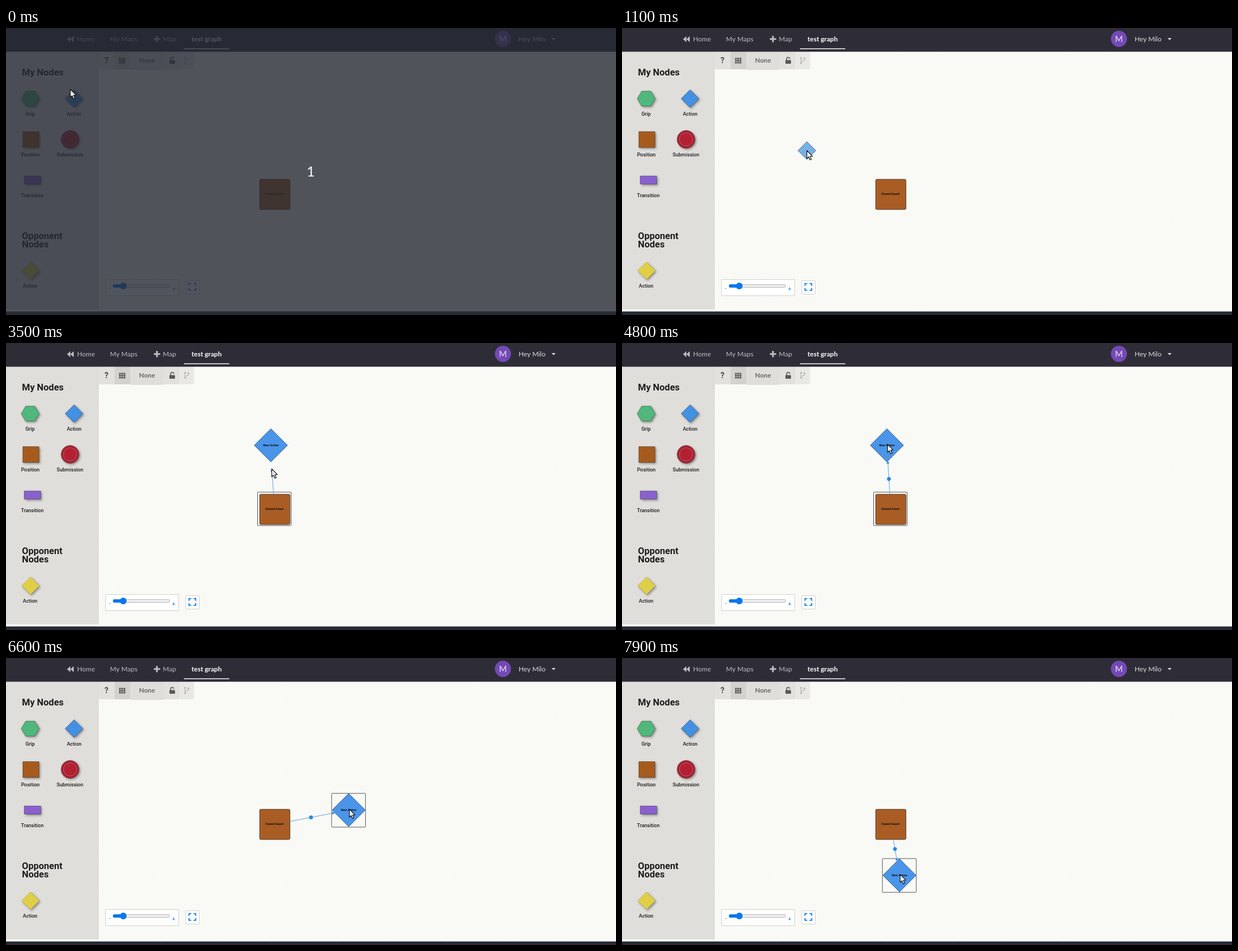
These frames come from a looping animation (1090x514 px, 8000 ms). An HTML page with a canvas:

```html
<!DOCTYPE html>
<html lang="en">
<head>
<meta charset="utf-8">
<title>Graph editor</title>
<style>
  html, body { margin: 0; width: 100%; height: 100%; overflow: hidden; background: #f9f9f5; }
  canvas { display: block; width: 1090px; height: 514px; }
</style>
</head>
<body>
<canvas id="stage" width="1090" height="514"></canvas>
<script>
const W = 1090, H = 514, LOOP = 8000, STEP = 100;
const ctx = document.getElementById('stage').getContext('2d');
const LATO = 'Lato, sans-serif', ROBOTO = 'Roboto, sans-serif';
const BLUE = '#2489e6', ACTION_BLUE = '#4490e2';

const LIFT = 400, DROP = 2200, PICK = 3100, RELEASE = 4300, LINK = 4500, GRAB = 4900;
const guard = { x: 480.3, y: 298, half: 27 };
const ACTION_R = 29.7;

// Pointer moves: each starts where the last one ended; "via" bends the path.
const moves = [
  { from: 100, to: 1600, end: [476, 194], via: [160, 275] },
  { from: 1700, to: 2000, end: [476, 184] },
  { from: 2100, to: 2300, end: [512, 254], via: [470, 177] },
  { from: 2400, to: 2900, end: [480, 300], via: [542, 268] },
  { from: 3000, to: 3800, end: [472.5, 191] },
  { from: 4400, to: 4800, end: [474.5, 181.5] }
];

// The action node is swung around the guard through these points: [time, x, y].
const swing = [
  [4900, 473.3, 183.2], [5300, 499, 173], [5900, 567.8, 204.8],
  [6700, 614, 283], [7200, 576.8, 342.8], [7900, 495.8, 389.2]
];

const mix = (a, b, u) => a + (b - a) * u;
const clamp = u => Math.max(0, Math.min(1, u));
const smooth = u => u * u * (3 - 2 * u);

function pointerAt(t) {
  if (t >= GRAB) {
    const p = actionAt(t);
    return { x: p.x + 1.2, y: p.y - 1.6 };
  }
  let at = [115, 110];
  for (const m of moves) {
    if (t < m.from) break;
    const u = smooth(clamp((t - m.from) / (m.to - m.from)));
    const bend = m.via || at.map((v, i) => mix(v, m.end[i], .5));
    at = at.map((v, i) => mix(mix(v, bend[i], u), mix(bend[i], m.end[i], u), u));
  }
  return { x: at[0], y: at[1] };
}

// Cubic through the swing points, with slopes taken from their neighbours.
function actionAt(t) {
  const last = swing.length - 1;
  t = Math.max(swing[0][0], Math.min(swing[last][0], t));
  const i = Math.max(0, swing.findIndex(k => k[0] >= t) - 1);
  const a = swing[i], b = swing[i + 1], span = b[0] - a[0], u = (t - a[0]) / span;
  const slope = (n, c) => {
    const p = swing[Math.max(0, n - 1)], q = swing[Math.min(last, n + 1)];
    return (q[c] - p[c]) / (q[0] - p[0]);
  };
  const at = c => mix(a[c], b[c], smooth(u))
    + span * u * (1 - u) * ((1 - u) * slope(i, c) - u * slope(i + 1, c));
  return { x: at(1), y: at(2) };
}

function paint(fill, stroke) {
  if (fill) { ctx.fillStyle = fill; ctx.fill(); }
  if (stroke) {
    ctx.shadowColor = 'transparent';
    ctx.strokeStyle = stroke;
    ctx.stroke();
  }
}

function rect(x, y, w, h, fill, stroke, r = 0) {
  ctx.beginPath();
  ctx.roundRect(x, y, w, h, r);
  paint(fill, stroke);
}

function disc(x, y, r, fill, stroke) {
  ctx.beginPath();
  ctx.arc(x, y, r, 0, Math.PI * 2);
  paint(fill, stroke);
}

function poly(points, fill, stroke) {
  ctx.beginPath();
  points.forEach(([x, y]) => ctx.lineTo(x, y));
  ctx.closePath();
  paint(fill, stroke);
}

function line(points, color, width) {
  ctx.lineWidth = width;
  ctx.beginPath();
  points.forEach(([x, y]) => ctx.lineTo(x, y));
  paint(null, color);
  ctx.lineWidth = 1;
}

function text(s, x, y, font, color, align = 'left') {
  ctx.font = font;
  ctx.fillStyle = color;
  ctx.textAlign = align;
  ctx.fillText(s, x, y);
}

const diamond = (x, y, r, fill, stroke) =>
  poly([[x, y - r], [x + r, y], [x, y + r], [x - r, y]], fill, stroke);

function shaded(draw) {
  ctx.save();
  ctx.shadowColor = 'rgba(0,0,0,.4)';
  ctx.shadowBlur = 4;
  ctx.shadowOffsetX = ctx.shadowOffsetY = 2;
  ctx.lineWidth = .6;
  draw();
  ctx.restore();
}

function header() {
  const pale = '#bdbcc1', light = '#dededf', base = 23.8;
  const link = (s, x) => text(s, x, base, '12px ' + LATO, pale);
  rect(0, 0, W, 42.5, '#2e2d37');
  for (const x of [109, 115]) poly([[x, 20], [x + 6, 14.8], [x + 6, 25.2]], pale);
  link('Home', 127);
  link('My Maps', 185.8);
  rect(264, 18.3, 11.5, 3, pale, null, .8);
  rect(268.2, 14, 3, 11.5, pale, null, .8);
  link('Map', 280.3);
  text('test graph', 358.5, base, 'bold 12px ' + LATO, '#fff', 'center');
  rect(318, 36.5, 81, 1.6, '#f4f4f5');
  disc(888, 19.5, 14.4, '#7449b6');
  text('M', 888, 25, '15px ' + LATO, '#eee8f6', 'center');
  text('Hey Milo', 916, base, '12px ' + LATO, light);
  poly([[975, 18], [982, 18], [978.5, 21.8]], light);
}

function sidebar() {
  const ink = '#1d1d1d', edge = 'rgba(40,40,40,.75)';
  const title = (s, y) => text(s, 28.5, y, 'bold 16.5px ' + ROBOTO, ink);
  const item = (s, x, y, shape) => {
    shaded(shape);
    text(s, x, y, '500 9px ' + ROBOTO, ink, 'center');
  };
  rect(0, 42, 166, 462, '#dfdedb');
  title('My Nodes', 85);
  title('Opponent', 378);
  title('Nodes', 393);
  const hexagon = Array.from({ length: 6 }, (_, i) => {
    const a = i * Math.PI / 3;
    return [43.3 + 16.2 * Math.cos(a), 126.5 + 15.5 * Math.sin(a)];
  });
  item('Grip', 43, 157, () => poly(hexagon, '#50b87c', edge));
  item('Action', 121.7, 157, () => diamond(121.7, 126.5, 16, ACTION_BLUE, edge));
  item('Position', 43.5, 230, () => rect(30, 185.5, 29, 28.5, '#a65b1d', edge));
  item('Submission', 114.3, 230, () => {
    disc(114.5, 199.5, 16, '#b42032', '#4a2428');
    disc(114.5, 199.5, 13, null, '#55282c');
    disc(114.5, 199.5, 12, null, '#c9898f');
  });
  item('Transition', 47, 302.8, () => rect(32.5, 265, 29.5, 14.5, '#8a60d0', edge));
  item('Action', 43, 465.2, () => diamond(43.8, 434.8, 15.8, '#e0cf46', 'rgba(120,110,40,.5)'));
}

function toolbar() {
  const ink = '#595959', faint = '#b9b8b6';
  rect(166, 42, 170, 32, '#e9e8e5', null, [0, 0, 4, 4]);
  rect(166, 42, 144, 32, '#e2e1de', null, [0, 0, 3, 3]);
  rect(194, 42, 28, 32, '#d3d2cf');
  rect(222, 42, 60, 33, '#dfdedb', null, [0, 0, 3, 3]);
  text('?', 179.5, 63, 'bold 14px ' + ROBOTO, '#4a4a4a', 'center');
  for (let i = 0; i < 9; i++) rect(202 + i % 3 * 4, 53.5 + (i / 3 | 0) * 3.6, 3.3, 2.8, ink);
  text('None', 252, 62, 'bold 11.7px ' + LATO, '#666', 'center');
  rect(292, 57.5, 10, 6.5, ink, null, 1);
  ctx.lineWidth = 1.6;
  ctx.beginPath();
  ctx.moveTo(294.2, 58);
  ctx.arc(296.9, 55.2, 2.7, Math.PI, 0);
  paint(null, ink);
  line([[320, 54], [320, 62]], faint, 1.3);
  line([[326, 55], [326, 57.5], [320, 60]], faint, 1.3);
  for (const [x, y] of [[320, 53.5], [320, 62.5], [326, 54.5]]) disc(x, y, 1.8, faint);
}

function zoomPanel() {
  const border = '#d0d0cd', fill = '#0b76ee';
  rect(178, 450.5, 130.5, 29, '#fff', border);
  text('-', 185.5, 470, '11px ' + ROBOTO, BLUE, 'center');
  text('+', 299.5, 471, '11px ' + ROBOTO, BLUE, 'center');
  rect(191.5, 459.5, 101, 5, '#efefef', '#b4b4b4', 2.5);
  rect(191, 459, 18, 6, fill, null, 3);
  disc(209.5, 462, 6, fill);
  rect(321, 452.5, 24.5, 24, '#fff', border, 1);
  for (const sx of [-1, 1]) for (const sy of [-1, 1]) {
    const x = 333 + sx * 6, y = 463.8 + sy * 6;
    line([[x - sx * 4, y], [x, y], [x, y - sy * 4]], BLUE, 2);
  }
}

function board() {
  rect(0, 42, W, 466, '#fcfcfa');
  rect(166, 42, W - 166, 462, '#f9f9f5');
  for (let y = 49; y < 504; y += 15)
    for (let x = 172; x < W; x += 15) rect(x, y, 1, 1, '#e7e7e3');
  rect(0, 507, W, 1, '#a9b4b8');
}

function nodeLabel(s, x, y) {
  text(s, x, y + 1.8, 'bold 5.4px ' + ROBOTO, '#111', 'center');
}

function guardNode(selected) {
  const { x, y, half } = guard;
  if (selected) rect(x - 30.8, y - 31, 60, 60, '#f7f7f5', '#555', 1);
  rect(x - half, y - half, half * 2, half * 2, '#a95d24', '#4f3726', 2);
  nodeLabel('Closed Guard', x - .7, y - .6);
}

function actionNode({ x, y }, selected) {
  if (selected) rect(x - 30.5, y - 30, 60.5, 60.5, null, '#555', 1);
  ctx.lineWidth = .8;
  diamond(x, y, ACTION_R, '#4a95e9', '#2c4766');
  ctx.lineWidth = 1;
  nodeLabel('New Action', x, y + .3);
}

// Arrow from the guard's border to p, stopping short by "inset" in diamond distance.
function edge(p, inset, dot) {
  const dx = p.x - guard.x, dy = p.y - guard.y;
  const reach = Math.max(Math.abs(dx), Math.abs(dy));
  if (reach <= guard.half) return;
  const along = s => [guard.x + dx * s, guard.y + dy * s];
  const head = 4.8 / Math.hypot(dx, dy);
  const start = guard.half / reach, end = 1 - inset / (Math.abs(dx) + Math.abs(dy));
  line([along(start), along(end)], '#5aa5e8', 1);
  if (dot) disc(...along((start + end - head) / 2), 3.4, BLUE);
  ctx.save();
  ctx.translate(...along(end));
  ctx.rotate(Math.atan2(dy, dx));
  poly([[0, 0], [-4.8, -2.6], [-4.8, 2.6]], BLUE);
  ctx.restore();
}

function pointer(p) {
  ctx.save();
  ctx.translate(p.x, p.y);
  ctx.lineJoin = 'round';
  ctx.lineWidth = 1.2;
  poly([[0, 0], [0, 14.2], [3.2, 11.3], [5.5, 16.8], [8, 15.7], [5.7, 10.4], [10, 10.2]], '#fff', '#111');
  ctx.restore();
}

function draw(t) {
  const tip = pointerAt(t), action = actionAt(t), grabbed = t > GRAB;
  ctx.lineWidth = 1;
  board();
  sidebar();
  toolbar();
  zoomPanel();
  header();

  guardNode(t >= PICK && !grabbed);
  if (t >= DROP) actionNode(action, grabbed);
  if (t >= PICK && t < RELEASE) edge(tip, 0, false);
  if (t >= LINK) edge(action, ACTION_R, true);

  if (t >= LIFT && t < DROP) {
    ctx.globalAlpha = .7;
    diamond(tip.x, tip.y, 16, ACTION_BLUE, '#345');
    ctx.globalAlpha = 1;
  }
  if (t < STEP) {
    rect(0, 0, W, H, 'rgba(38,42,52,.8)');
    text('1', 544.5, 266, '25px ' + LATO, '#fff', 'center');
  }
  rect(0, 508, W, 6, '#272b34');
  pointer(tip);
}

let shown = -1;
function tick() {
  const t = Math.floor(performance.now() % LOOP / STEP) * STEP;
  if (t !== shown) draw(shown = t);
  requestAnimationFrame(tick);
}
tick();
</script>
</body>
</html>
```
